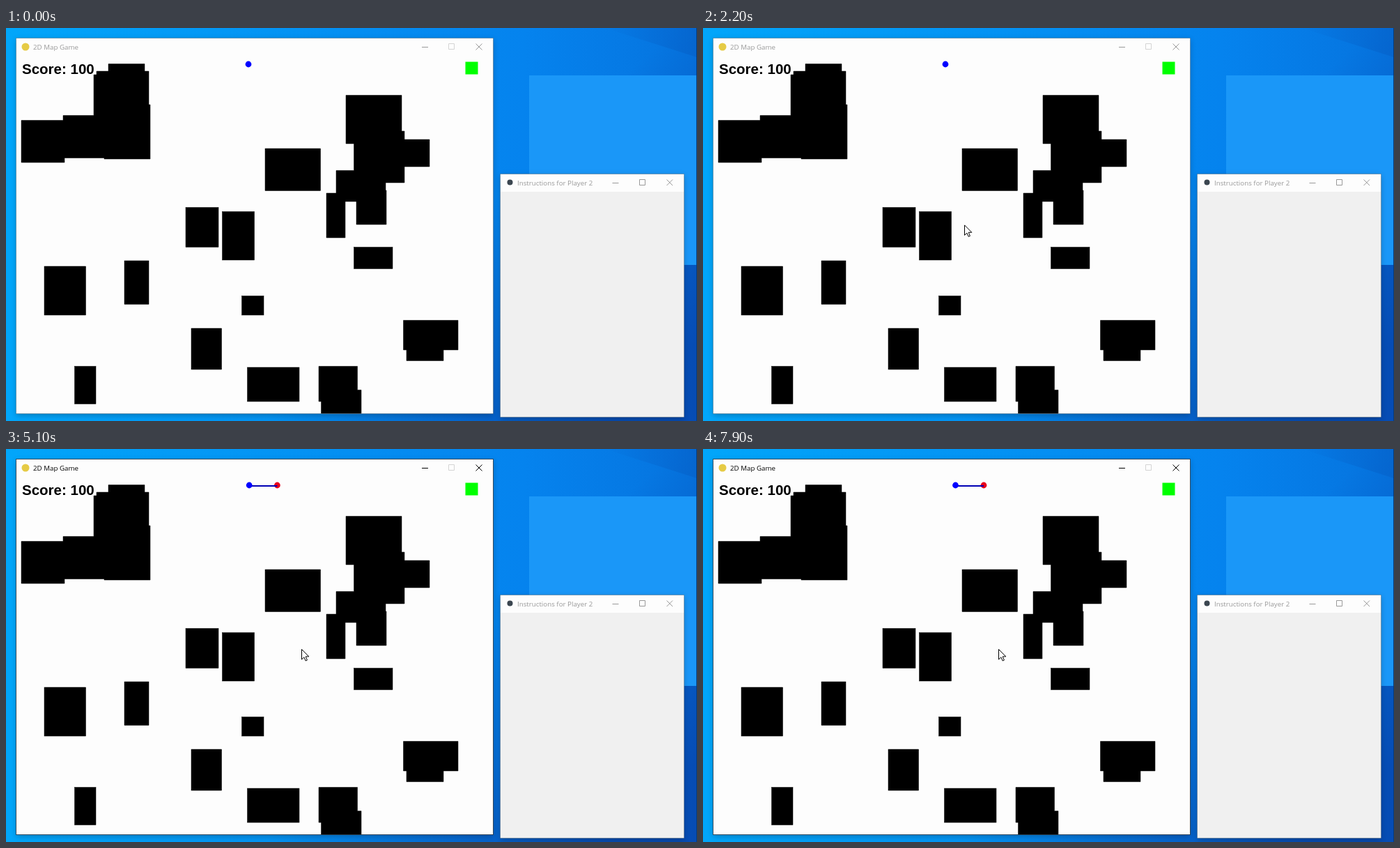
Write an HTML page that moves like this. It is 992 by 564 pixels and loops after 8000 ms.

```html
<!DOCTYPE html>
<html lang="en">
<head>
<meta charset="utf-8">
<title>2D Map Game</title>
<style>
  html, body { margin: 0; width: 100%; height: 100%; overflow: hidden; background: #0084e4; }
  svg { display: block; width: 992px; height: 564px; }
  .title { font: 9.75px "Open Sans", sans-serif; fill: var(--ink); }
  .score { font: bold 20.5px "Liberation Sans", Arial, sans-serif; }
  .idle { --ink: #999; --edge: .3; }
  .active { --ink: #000; --edge: .75; }
  .edge { fill: #fdfdfd; stroke: #1c2834; stroke-opacity: var(--edge); }
  .shade { opacity: .25; filter: blur(4px); }
  .control { fill: none; stroke: var(--ink); }
  .off { stroke: #d4d4d4; }
  .walls { stroke: #000; stroke-width: .5; }
</style>
</head>
<body>
<svg viewBox="0 0 992 564">
  <defs>
    <linearGradient id="sky">
      <stop stop-color="#02a6fa"/>
      <stop offset=".75" stop-color="#0583ee"/>
      <stop offset="1" stop-color="#0673de"/>
    </linearGradient>
    <linearGradient id="dusk" gradientUnits="userSpaceOnUse" x1="700" y1="250" x2="940" y2="500">
      <stop stop-color="#0648b0" stop-opacity="0"/>
      <stop offset="1" stop-color="#0648b0" stop-opacity=".9"/>
    </linearGradient>
    <linearGradient id="glow">
      <stop stop-color="#0560c8" stop-opacity="0"/>
      <stop offset="1" stop-color="#0560c8" stop-opacity=".6"/>
    </linearGradient>
  </defs>

  <rect width="992" height="564" fill="url(#sky)"/>
  <rect width="992" height="564" fill="url(#dusk)"/>
  <path d="M860 0H992V42Z" fill="url(#glow)"/>
  <rect x="751" y="68" width="272" height="272" fill="#1a97f8"/>
  <rect x="991" width="1" height="564" fill="#073c7c"/>

  <g id="game" class="idle">
    <rect class="shade" x="15" y="17" width="684" height="539"/>
    <rect class="edge" x="14.5" y="14.5" width="685" height="539"/>
    <circle cx="28" cy="27" r="5.5" fill="#e6cb45"/>
    <text class="title" x="39" y="31">2D Map Game</text>
    <path class="control" d="M597 27.5h9M674.5 22.5l9 9m0-9l-9 9"/>
    <path class="control off" d="M635.5 22.5h8v8h-8z"/>

    <g class="walls">
      <path d="M147 51.500H199V62H205V110H207V188H141V186.500H84V193H22V132.500H82V125.500H126V67H130V62H147Z"/>
      <path d="M488 96.500H568V148H572V160H608V199H572V222H545V233H546V282H503V249H487V301H460V237H474V204.500H499.500V166H488Z"/>
      <path d="M570.500 419.500H649V462H628V477.500H575V462H570.500Z"/>
      <path d="M449 485.500H504.500V519.500H510V553H452.500V536H449Z"/>
      <rect x="372" y="173" width="79.500" height="60.500"/>
      <rect x="258" y="257.500" width="47" height="57"/>
      <rect x="310.500" y="263.500" width="46" height="69.500"/>
      <rect x="499.500" y="314.500" width="55.500" height="31"/>
      <rect x="55" y="342" width="59.500" height="70"/>
      <rect x="170" y="334" width="35" height="62.500"/>
      <rect x="338.500" y="384.500" width="31.500" height="27.500"/>
      <rect x="266" y="431" width="43.500" height="59"/>
      <rect x="98.500" y="485.500" width="30.500" height="54"/>
      <rect x="346.500" y="487" width="74.500" height="49"/>
    </g>

    <text class="score" x="23" y="66">Score: 100</text>
    <rect x="659.5" y="48.5" width="18" height="18" fill="#0f0"/>
    <circle id="red" cy="52" r="4.4" fill="#e8001c"/>
    <path id="rope" stroke="#0000b4" stroke-width="2"/>
    <circle id="blue" cy="52" r="4.4" fill="#00f"/>
  </g>

  <g class="idle">
    <rect class="shade" x="710" y="212" width="263" height="349"/>
    <rect class="edge" x="709.5" y="209.5" width="264" height="349"/>
    <rect x="710" y="235" width="263" height="323" fill="#f0f0f0"/>
    <circle cx="723.5" cy="221.5" r="4" fill="#3b4650"/>
    <text class="title" x="734" y="225.5">Instructions for Player 2</text>
    <path class="control" d="M870.5 222.5h9M909.5 217.5h8v8h-8zM948.5 217.5l8.500 8.500m0-8.500l-8.500 8.500"/>
    <rect id="hint" x="840.5" y="277.5" width="35" height="4.5" fill="#12ee28"/>
  </g>

  <path id="pointer" d="M0 0V14.500L3.400 11.300L5.700 16.500L7.900 15.500L5.700 10.400H10.300Z" fill="#fff" stroke="#000"/>
</svg>
<script>
const $ = id => document.getElementById(id);
const show = (id, on) => $(id).setAttribute('visibility', on ? 'visible' : 'hidden');

const home = 348;    // where both players begin
const launch = 3.25; // red sets off, in seconds
const taut = 4.85;   // the rope tightens and blue is dragged along

function draw(s) {
  const pulled = Math.max(0, s - taut);
  const free = Math.max(0, Math.min(s, taut) - launch);
  const red = home + 24 * free + 19 * (1 - Math.exp(-pulled / 1.47));
  const blue = home + 4.75 * pulled;
  $('red').setAttribute('cx', red);
  $('blue').setAttribute('cx', blue);
  $('rope').setAttribute('d', `M${blue} 53H${red}`);
  show('red', free > 0);
  show('rope', free > 0);
  show('hint', s >= 5.4 && s < 6.4);

  const slide = Math.max(0, Math.min(1, (s - 1.9) / 0.5));
  show('pointer', s >= 1.9);
  $('pointer').setAttribute('transform', `translate(${302 + 122.5 * slide} ${276 + 11.5 * slide})`);
  $('game').setAttribute('class', s < 2.5 ? 'idle' : 'active');
}

const start = performance.now();
function tick() {
  // The picture advances ten times a second.
  draw(Math.floor((performance.now() - start) % 8000 / 100) / 10);
  requestAnimationFrame(tick);
}
tick();
</script>
</body>
</html>
```
